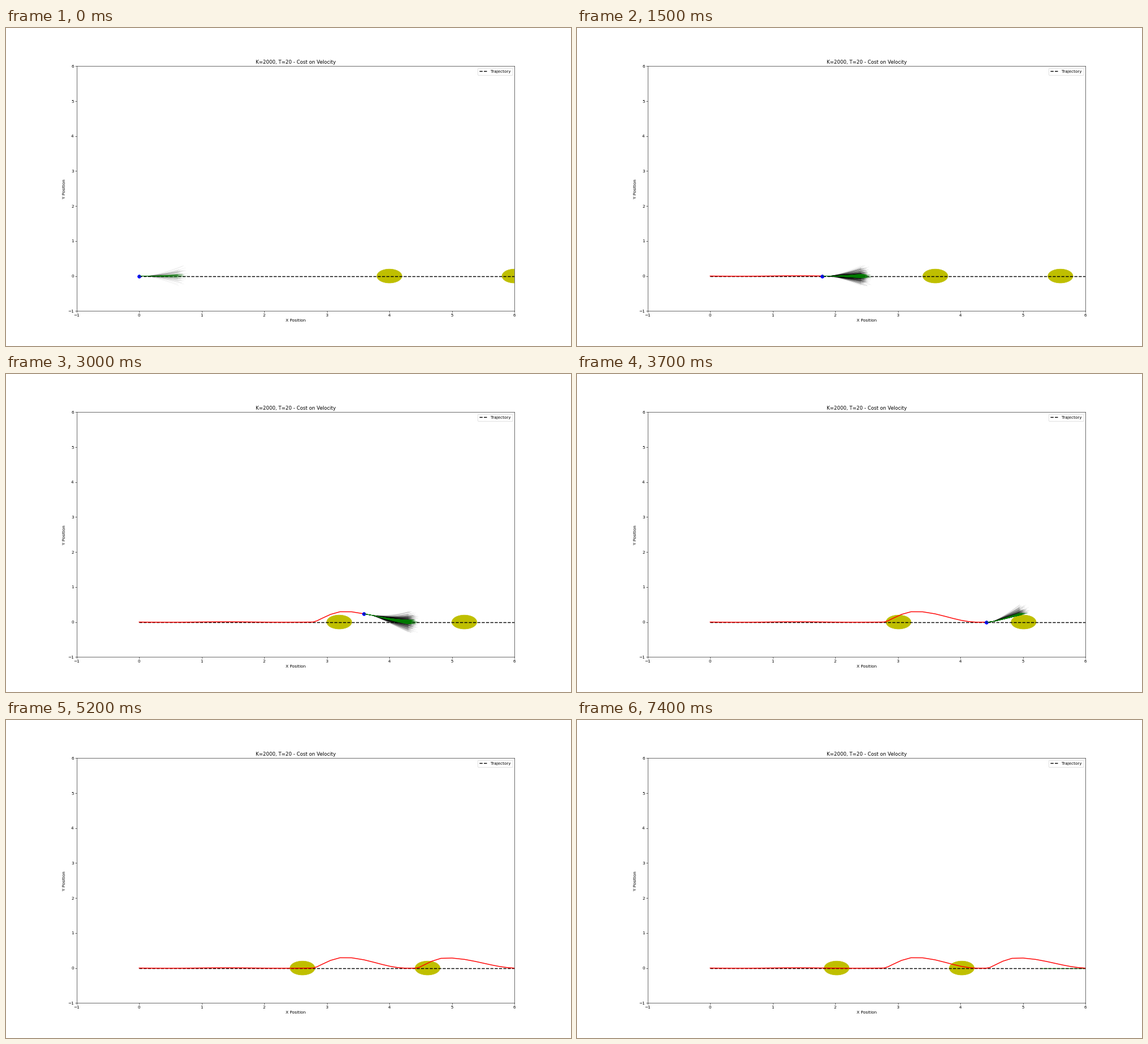
Animation, 998 px wide and 561 px high, one loop 7500 ms. Source, as a matplotlib script:

```python
import numpy as np
import matplotlib.pyplot as plt
from matplotlib.animation import FuncAnimation
from matplotlib.collections import LineCollection
from matplotlib.patches import Circle

DPI = 52
FRAMES, INTERVAL = 75, 100
RADIUS = 0.2
CRUISE = 0.1195


def obstacles(n):
    return 4 - 0.02673 * n, 6 - 0.02673 * n


def bell(d, center, width):
    return np.exp(-((d - center) / width) ** 2)


def speed(x, n):
    """Step length: slow before an obstacle, fast alongside it."""
    v = CRUISE
    for ox in obstacles(n):
        v += 0.08 * bell(ox - x, -0.12, 0.35) - 0.065 * bell(ox - x, 0.63, 0.16)
    return v


def detour(x, start, top, stop, height):
    """Steep climb from start to top, gentle return to zero at stop."""
    up = np.clip((x - start) / (top - start), 0, 1)
    down = np.clip((x - top) / (stop - top), 0, 1)
    return height * np.sin(np.pi / 2 * up) ** 1.2 * np.cos(np.pi / 2 * down) ** 2


def path_y(x):
    sway = -0.006 * np.sin(2 * np.pi * x / 1.85)
    return (sway + detour(x, 2.79, 3.28, 4.3, 0.297)
            + detour(x, 4.44, 4.9, 6.08, 0.285))


robot_x = np.zeros(FRAMES)
for step in range(1, FRAMES):
    last = robot_x[step - 1]
    robot_x[step] = last + speed(last, step - 1)
robot_y = path_y(robot_x)
velocity = np.gradient(robot_x)
slope = np.gradient(robot_y, robot_x)


def rollouts(n):
    """Sampled paths that miss the obstacles, cheapest first."""
    rng = np.random.default_rng(100 + n)
    count = 700 if n else 90
    x, y = robot_x[n], robot_y[n]
    near = any(-0.3 < ox - x < 0.7 for ox in obstacles(n))
    goal = 0.7 * path_y(x + 0.62) if near else 0

    mean = 0.48 + 1.5 * velocity[n]
    length = np.clip(rng.normal(mean, 0.05, count), mean - 0.04, mean + 0.12)
    end = goal + np.clip(rng.normal(0, 0.12, count), -0.3, 0.3)

    u = np.linspace(0, 1, 20)
    s = length[:, None] * u
    spread = np.clip((u - 0.15) / 0.85, 0, 1) ** 1.4
    px = x + s
    py = y + slope[n] * s * (1 - u) + (end - y)[:, None] * spread
    free = np.ones(count, bool)
    for ox in obstacles(n):
        hit = np.hypot(px - ox, py) < RADIUS
        free &= ~hit[:, 2:].any(axis=1)
    keep = np.flatnonzero(free)
    keep = keep[np.argsort(np.abs(end[keep]))]
    return np.stack([px[keep], py[keep]], axis=-1)


fig, ax = plt.subplots(figsize=(998 / DPI, 561 / DPI), dpi=DPI)
ax.set(xlim=(-1, 6), ylim=(-1, 6), xlabel="X Position", ylabel="Y Position",
       title="K=2000, T=20 - Cost on Velocity")
ax.plot([0, 8], [0, 0], "k--", lw=2, label="Trajectory")
ax.legend(loc="upper right")

discs = [ax.add_patch(Circle((ox, 0), RADIUS, color="y")) for ox in obstacles(0)]
trail, = ax.plot([], [], "r", lw=2, zorder=3)
robot, = ax.plot([], [], "bo", ms=8, zorder=4)
costly = LineCollection([], colors="k", linewidths=0.6, alpha=0.1, zorder=5)
cheap = LineCollection([], colors="g", linewidths=0.6, alpha=0.28, zorder=6)
ax.add_collection(costly, autolim=False)
ax.add_collection(cheap, autolim=False)
back, = ax.plot([], [], color="#3cc23c", lw=1.8, zorder=1.9)


def update(n):
    for disc, ox in zip(discs, obstacles(n)):
        disc.center = (ox, 0)
    trail.set_data(robot_x[:n + 1], robot_y[:n + 1])
    robot.set_data([robot_x[n]], [robot_y[n]])

    lines = rollouts(n)
    costly.set_segments(lines)
    cheap.set_segments(lines[:int(0.4 * len(lines))])

    # The robot turns round off stage and its rollouts come back in
    tip = 5.27 + CRUISE * (FRAMES - 1 - n)
    back.set_data([tip, max(tip, 6.1)], [-0.01, -0.01])
    return [*discs, trail, robot, costly, cheap, back]


anim = FuncAnimation(fig, update, frames=FRAMES, interval=INTERVAL,
                     repeat=True, repeat_delay=0)
plt.show()
```
